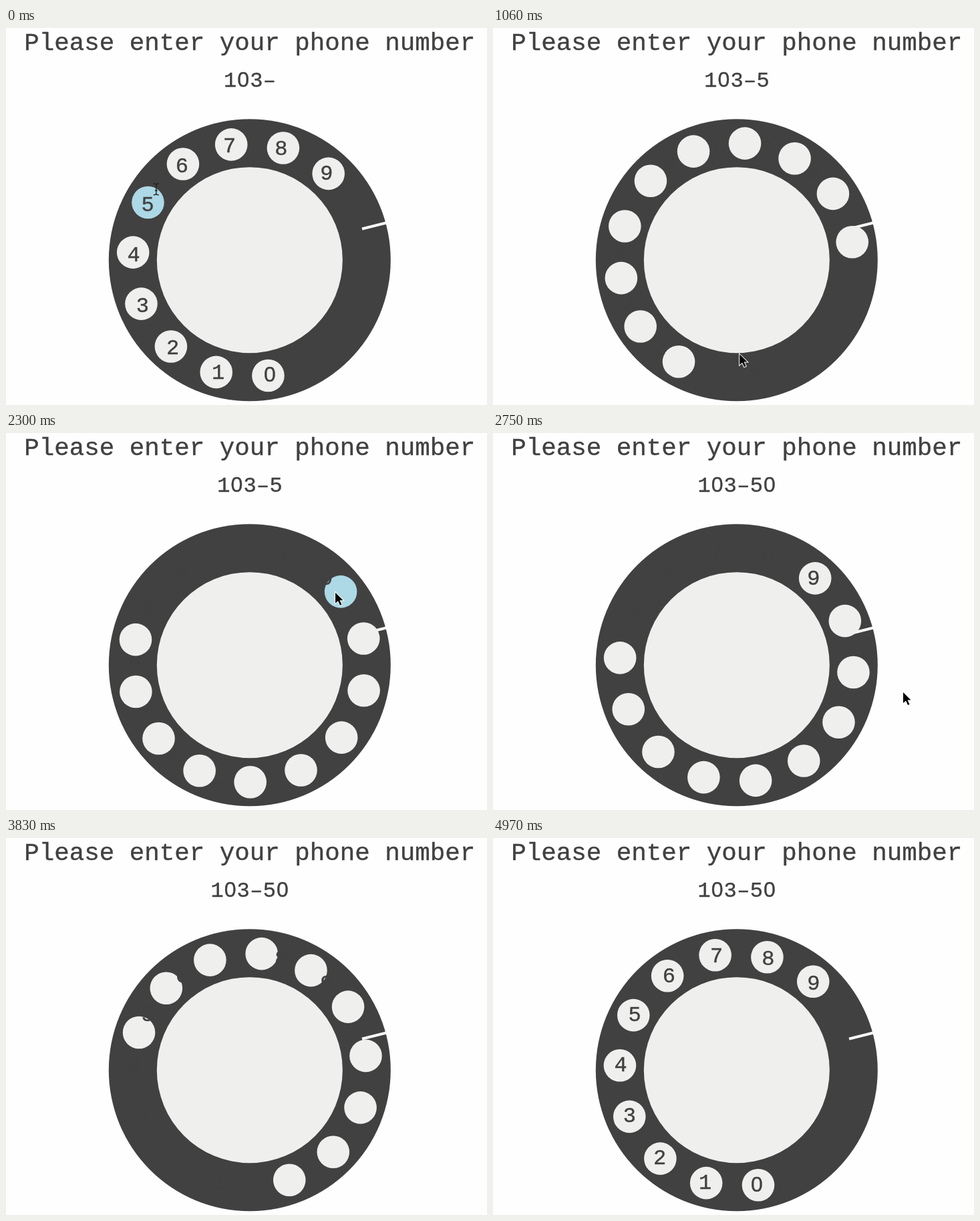
These frames come from a looping animation (720 by 564 pixels, 5.06 s). An HTML page with a canvas:

```html
<!DOCTYPE html>
<html lang="en">
<head>
<meta charset="utf-8">
<title>Rotary phone input</title>
<style>
  html, body { margin: 0; width: 100%; height: 100%; overflow: hidden; background: #fefefe; }
  canvas { display: block; }
</style>
</head>
<body>
<canvas id="stage" width="720" height="564"></canvas>
<script>
const ctx = document.getElementById('stage').getContext('2d');
const LOOP = 5060;
const PAPER = '#fefefe', DARK = '#414141', PALE = '#eff0ee', HELD = '#add8e6';
const CX = 364.8, CY = 347.2, HOLE_RING = 175, HOLE_RADIUS = 24.3;
const REST = 79.4, STEP = 360 / 14, LABEL_SHIFT = 0.6;
const RETURN_SPEED = 0.105; // degrees per ms

const five = { digit: 5, start: 0, release: 145, from: 1.5, to: 136.5 };
const zero = { digit: 0, start: 1720, release: 2434, from: 0, to: 266 };

const mix = (a, b, k) => a + (b - a) * k;
const progress = (t, start, end) => Math.min(1, Math.max(0, (t - start) / (end - start)));
const smooth = k => k * k * (3 - 2 * k);

function polar(degrees, radius) {
  const a = degrees * Math.PI / 180;
  return [CX + radius * Math.cos(a), CY + radius * Math.sin(a)];
}

function move(from, to, k) {
  return from.map((v, i) => mix(v, to[i], k));
}

// The dial follows the drag, then runs back at constant speed
function turnAt(t) {
  const { start, release, from, to } = t < zero.start ? five : zero;
  return t < release
    ? mix(from, to, smooth(progress(t, start, release)))
    : Math.max(0, to - RETURN_SPEED * (t - release));
}

function cursorAt(t, turn) {
  const pause = [369, 488], grab = [400, 511];
  if (t < five.release) return polar(215.6 + turn, 175.6);
  if (t < 1060) return move([539, 325], pause, progress(t, five.release, 1060));
  if (t < zero.start) return move(pause, grab, progress(t, 1060, 1500));
  if (t < zero.release) return polar(78 + turn, 168);
  return move([527, 300], [614, 388], progress(t, zero.release, 2750));
}

function disc(x, y, radius, color) {
  ctx.fillStyle = color;
  ctx.beginPath();
  ctx.arc(x, y, radius, 0, 2 * Math.PI);
  ctx.fill();
}

function write(text, x, baseline, size, family = '"Liberation Mono", monospace') {
  ctx.font = `${size}px ${family}`;
  ctx.textAlign = 'center';
  ctx.fillStyle = ctx.strokeStyle = DARK;
  ctx.lineWidth = 0.4;
  ctx.fillText(text, x, baseline);
  ctx.strokeText(text, x, baseline);
}

// The sans zero has no dot inside
function writeDigit(char, x, baseline) {
  write(char, x, baseline, 32, char === '0' ? '"Liberation Sans", sans-serif' : undefined);
}

function drawNumber(text) {
  [...text].forEach((char, i) =>
    writeDigit(char, 365 + (i - (text.length - 1) / 2) * 19.6, 87.5));
}

function drawDial(turn, held) {
  disc(CX, CY, 211, DARK);
  disc(CX, CY, 139, PALE);
  ctx.strokeStyle = '#fafafa';
  ctx.lineWidth = 4;
  ctx.beginPath();
  ctx.moveTo(533, 300.5);
  ctx.lineTo(569, 291.5);
  ctx.stroke();
  // Labels stay put; each later hole covers the labels before it
  for (let i = 0; i < 10; i++) {
    const angle = REST + i * STEP;
    disc(...polar(angle + turn, HOLE_RING), HOLE_RADIUS, i === held ? HELD : PALE);
    const [x, y] = polar(angle + LABEL_SHIFT, 174);
    writeDigit(String(i), x, y + 10.5);
  }
}

function drawCursor(x, y, isText) {
  ctx.save();
  ctx.translate(x, y);
  const shape = new Path2D(isText
    ? 'M-4-8.5Q0-8.5 0-6Q0-8.5 4-8.5M0-6V6M-4 8.5Q0 8.5 0 6Q0 8.5 4 8.5M-2 2H2'
    : 'M0 0V16L4 12.5L7 19L9.5 18L6.5 11.5H11.5Z');
  ctx.strokeStyle = isText ? '#222' : '#fff';
  ctx.lineWidth = isText ? 1.4 : 2;
  ctx.stroke(shape);
  if (!isText) {
    ctx.fillStyle = '#000';
    ctx.fill(shape);
  }
  ctx.restore();
}

function draw(t) {
  const turn = turnAt(t);
  const dragsFive = t < five.release;
  const holdsZero = t >= 1500 && t < zero.release;
  ctx.fillStyle = PAPER;
  ctx.fillRect(0, 0, 720, 564);
  write('Please enter your phone number', 364.7, 33, 37.5);
  drawNumber('103–' + [five, zero].filter(d => t >= d.release).map(d => d.digit).join(''));
  drawDial(turn, dragsFive ? five.digit : holdsZero ? zero.digit : -1);
  if (t < 3020) drawCursor(...cursorAt(t, turn), dragsFive);
}

function frame() {
  draw(performance.now() % LOOP);
  requestAnimationFrame(frame);
}
frame();
</script>
</body>
</html>
```
